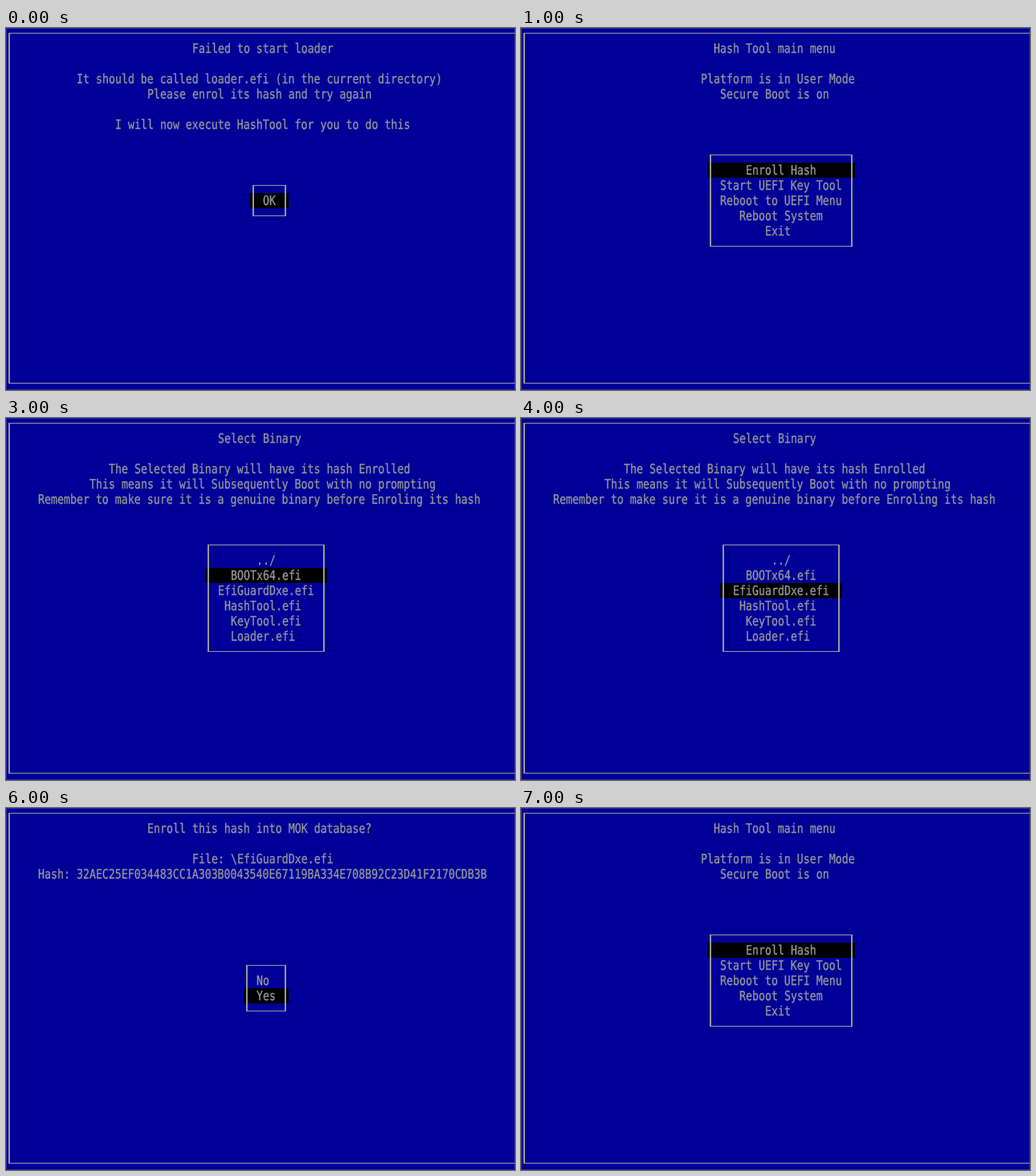
An HTML page that plays this animation: 634x452 px, repeating every 8000 ms.

```html
<!DOCTYPE html>
<html lang="en">
<head>
<meta charset="utf-8">
<title>Hash enrolment</title>
<style>
  html, body { margin: 0; width: 100%; height: 100%; overflow: hidden; background: #000098; }
  svg { display: block; }
  text {
    font: 13.288px "DejaVu Sans Mono", monospace;
    fill: #989898; stroke: #989898; stroke-width: .25;
    white-space: pre; text-rendering: geometricPrecision;
  }
</style>
</head>
<body>
<svg id="stage" width="634" height="452" viewBox="0 0 634 452"></svg>
<script>
const CW = 8, RH = 19, COLS = 79, LINE = '#989898', STRETCH = 1.22;
const stage = document.getElementById('stage');

const cellX = col => col * CW;
const cellY = row => row * RH - 3;

const rect = (x, y, w, h, fill) =>
  `<rect x="${x}" y="${y}" width="${w}" height="${h}" fill="${fill}"/>`;

// The console face is taller than the system one at the same cell width.
const label = (str, col, row) =>
  `<text transform="translate(${cellX(col)} ${cellY(row) + 15}) scale(1 ${STRETCH})">${str}</text>`;

// Lines run through the cell centres: 2px upright, 1px across.
function box(left, top, right, bottom) {
  const x = cellX(left) + 3, y = cellY(top) + 9;
  const w = cellX(right - left) + 2, h = (bottom - top) * RH + 1;
  return rect(x, y, w, 1, LINE) + rect(x, y + h - 1, w, 1, LINE) +
         rect(x, y, 2, h, LINE) + rect(x + w - 2, y, 2, h, LINE);
}

const heading = lines => lines.map((str, i) =>
  label(str, Math.round((COLS - str.length) / 2), i + 1)).join('');

function menu(items, row, picked) {
  const len = Math.max(...items.map(s => s.length));
  const col = Math.floor((82 - len) / 2);
  const left = col - 2, right = col + len + 1;
  return rect(cellX(left), cellY(row + picked), cellX(right - left + 1), RH, '#000') +
    box(left, row - 1, right, row + items.length) +
    items.map((s, i) => label(s, col + Math.floor((len - s.length) / 2), row + i)).join('');
}

const failed = {
  head: ['Failed to start loader', '',
    'It should be called loader.efi (in the current directory)',
    'Please enrol its hash and try again', '',
    'I will now execute HashTool for you to do this'],
  items: ['OK'], row: 11
};
const main = {
  head: ['Hash Tool main menu', '', 'Platform is in User Mode', 'Secure Boot is on'],
  items: ['Enroll Hash', 'Start UEFI Key Tool', 'Reboot to UEFI Menu', 'Reboot System', 'Exit'],
  row: 9
};
const files = {
  head: ['Select Binary', '',
    'The Selected Binary will have its hash Enrolled',
    'This means it will Subsequently Boot with no prompting',
    'Remember to make sure it is a genuine binary before Enroling its hash'],
  items: ['../', 'BOOTx64.efi', 'EfiGuardDxe.efi', 'HashTool.efi', 'KeyTool.efi', 'Loader.efi'],
  row: 9
};
const confirm = {
  head: ['Enroll this hash into MOK database?', '',
    'File: \\EfiGuardDxe.efi',
    'Hash: 32AEC25EF034483CC1A303B0043540E67119BA334E708B92C23D41F2170CDB3B'],
  items: ['No', 'Yes'], row: 11
};

// One screen and picked item per second.
const steps = [[failed, 0], [main, 0], [files, 0], [files, 1],
               [files, 2], [confirm, 0], [confirm, 1], [main, 0]];

const backdrop = rect(0, 0, 634, 452, '#000098') +
  '<rect x=".5" y=".5" width="633" height="451" fill="none" stroke="#2828a6"/>' +
  box(0, 0, 79, 23);

let shown = -1;
function draw(ms) {
  const n = Math.floor(ms / 1000) % steps.length;
  if (n === shown) return;
  shown = n;
  const [screen, picked] = steps[n];
  stage.innerHTML = backdrop + heading(screen.head) + menu(screen.items, screen.row, picked);
}

const start = performance.now();
function tick() {
  draw(performance.now() - start);
  requestAnimationFrame(tick);
}
tick();
</script>
</body>
</html>
```
